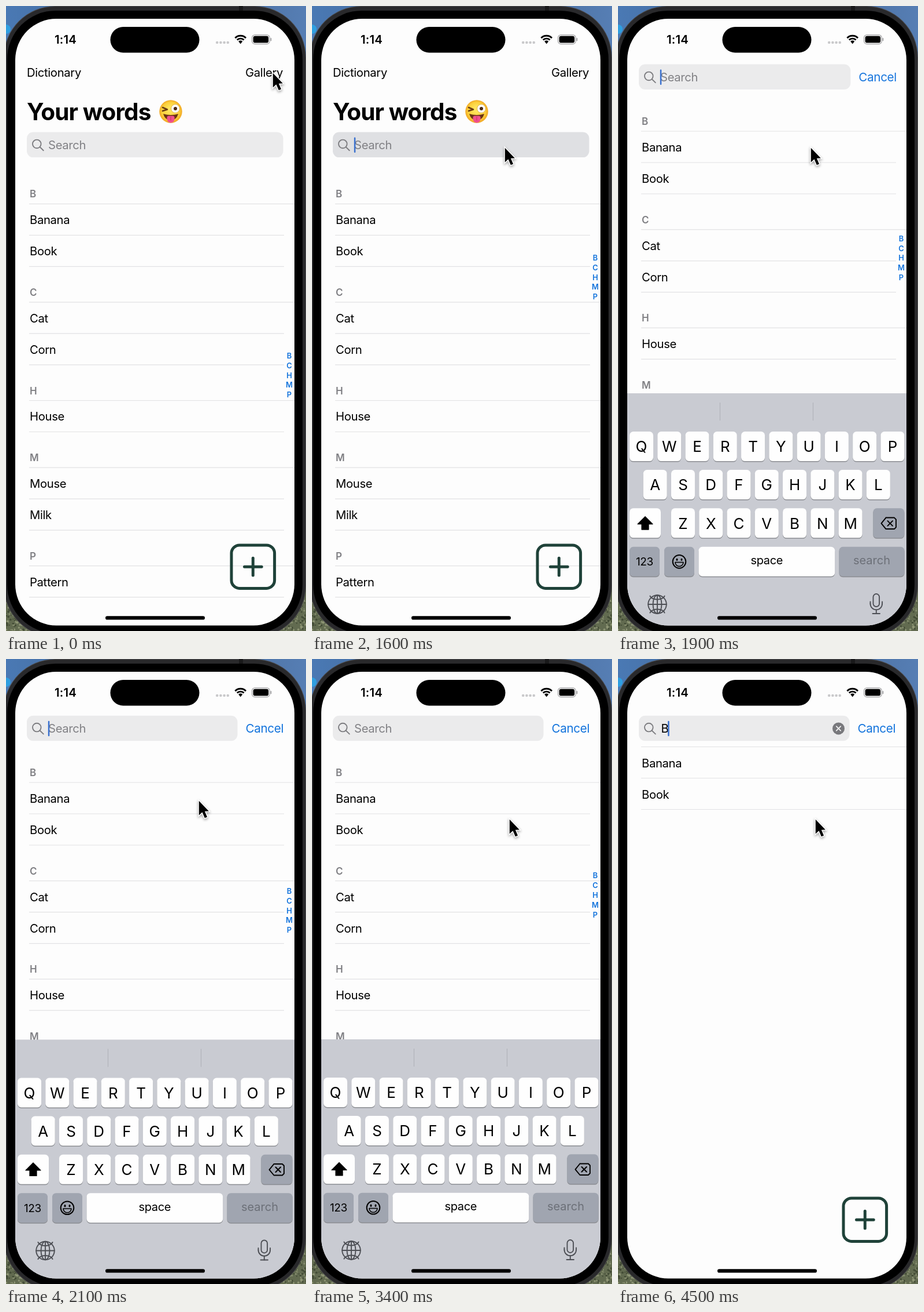
Animation of 519x1078 px, one loop 5000 ms. Source, as an HTML page with a canvas:

```html
<!DOCTYPE html>
<html lang="en">
<head>
<meta charset="utf-8">
<title>Word list search</title>
<style>
html, body { margin: 0; width: 100%; height: 100%; overflow: hidden; background: #000; }
canvas { display: block; width: 519px; height: 1078px; }
</style>
</head>
<body>
<canvas id="stage" width="519" height="1078"></canvas>
<script>
const ctx = document.getElementById('stage').getContext('2d');
const LOOP = 5000, STEP = 100, TAU = Math.PI * 2;
const BLUE = '#1273dc', PAPER = '#fdfdfd', GREY = '#7f7f83';
const SECTIONS = [
  ['B', 'Banana', 'Book'], ['C', 'Cat', 'Corn'], ['H', 'House'],
  ['M', 'Mouse', 'Milk'], ['P', 'Pattern']
];

// Timing helpers
const clamp = v => Math.min(1, Math.max(0, v));
const mix = (a, b, p) => a + (b - a) * p;
const smooth = (t, a, b) => { const u = clamp((t - a) / (b - a)); return u * u * (3 - 2 * u); };
const spring = (t, start) => {
  const x = Math.max(0, t - start) * 0.01826;
  return 1 - (1 + x) * Math.exp(-x);
};

// Drawing helpers
function box(x, y, w, h, r, color) {
  ctx.beginPath();
  ctx.roundRect(x, y, w, h, r);
  ctx.fillStyle = color;
  ctx.fill();
}
function disc(x, y, r, color) {
  ctx.beginPath();
  ctx.arc(x, y, r, 0, TAU);
  ctx.fillStyle = color;
  ctx.fill();
}
function pen(color, width) {
  ctx.strokeStyle = color;
  ctx.lineWidth = width;
  ctx.lineCap = ctx.lineJoin = 'round';
}
function line(...pts) {
  ctx.beginPath();
  for (let i = 0; i < pts.length; i += 2) ctx.lineTo(pts[i], pts[i + 1]);
  ctx.stroke();
}
function ring(x, y, rx, ry = rx, a = 0, b = TAU) {
  ctx.beginPath();
  ctx.ellipse(x, y, rx, ry, 0, a, b);
  ctx.stroke();
}
// y is the middle of the capital letters
function text(s, x, y, size, color = '#000', weight = 400, align = 'left', track = -0.018) {
  ctx.font = `${weight} ${size}px Inter, "Liberation Sans", sans-serif`;
  ctx.letterSpacing = `${track * size}px`;
  ctx.textAlign = align;
  ctx.fillStyle = color;
  ctx.fillText(s, x, y + size * 0.364);
}
const rule = (y, right) => box(40, y - 0.6, right - 40, 1.2, 0, '#e2e2e4');

function backdrop() {
  const sky = ctx.createLinearGradient(0, 0, 519, 0);
  sky.addColorStop(0, '#4a79b4');
  sky.addColorStop(0.5, '#42638f');
  sky.addColorStop(1, '#567eb4');
  box(0, 0, 519, 540, 0, sky);
  disc(0, 40, 8, '#2f9fe0');
  box(0, 540, 519, 538, 0, '#626b50');
  let seed = 7;
  const rnd = () => (seed = seed * 16807 % 2147483647) / 2147483647;
  for (let i = 0; i < 500; i++) {
    const x = rnd() * 60, y = 1015 + rnd() * 63;
    disc(i % 2 ? x : 519 - x, y, 0.8 + rnd() * 1.2, rnd() < 0.5 ? '#434c36' : '#8d9474');
  }
  box(-4, 0, 523, 1089, 89, '#4b4b4d');
  box(-3, 1, 521, 1087, 88, '#29292b');
  box(403, 0, 7, 8, 0, '#19191a');
  box(2, 8, 511, 1074, 84, '#000');
}

function statusBar() {
  text('1:14', 84, 58, 20.4, '#000', 600, 'left', 0.01);
  box(180.5, 36, 154, 44.5, 22.2, '#000');
  for (let i = 0; i < 4; i++) disc(365.2 + i * 6.2, 63, 2.3, '#c9c9cb');
  ctx.strokeStyle = '#000';
  ctx.lineCap = 'butt';
  ctx.lineWidth = 2.9;
  for (const r of [13.2, 8.4]) ring(405.7, 64.5, r, r, -Math.PI * 0.75, -Math.PI * 0.25);
  ctx.beginPath();
  ctx.moveTo(405.7, 65.5);
  ctx.arc(405.7, 64.5, 5, -Math.PI * 0.75, -Math.PI * 0.25);
  ctx.fillStyle = '#000';
  ctx.fill();
  pen('#a0a0a2', 1.2);
  ctx.beginPath();
  ctx.roundRect(425.6, 49.8, 30.6, 15.8, 5);
  ctx.stroke();
  box(427.6, 51.8, 26.6, 11.8, 3.4, '#000');
  box(457.5, 55, 1.8, 5.4, 1, '#a0a0a2');
}

function winkFace(x, y) {
  ctx.save();
  ctx.translate(x, y);
  const skin = ctx.createRadialGradient(0, -4, 4, 0, 0, 20);
  skin.addColorStop(0, '#ffe45c');
  skin.addColorStop(0.7, '#fccf3a');
  skin.addColorStop(1, '#f0a322');
  disc(0, 0, 19.7, skin);
  pen('#6b3d13', 2.6);
  line(-14, -7, -6, -3.5, -14, -1);
  disc(8, -5, 7.4, '#fff');
  pen('#d9a233', 0.8);
  ring(8, -5, 7.4);
  disc(8, -5, 3, '#4c2b14');
  ctx.beginPath();
  ctx.moveTo(-13, 4);
  ctx.quadraticCurveTo(0, 8, 13, 4);
  ctx.quadraticCurveTo(10, 15, 0, 15);
  ctx.quadraticCurveTo(-10, 15, -13, 4);
  ctx.fillStyle = '#6b3312';
  ctx.fill();
  box(-6.5, 7.5, 13, 12, [3, 3, 6.5, 6.5], '#f0508c');
  pen('#c9316c', 1.2);
  line(0, 9, 0, 15);
  ctx.restore();
}

function titles(p) {
  ctx.save();
  ctx.globalAlpha = clamp(1 - p * 1.6);
  ctx.translate(0, -119.5 * p);
  text('Dictionary', 36, 115, 20.3);
  text('Gallery', 479, 115, 20.3, '#000', 400, 'right');
  text('Your words', 36, 182, 40.5, '#000', 700, 'left', -0.023);
  winkFace(285, 182);
  ctx.restore();
}

function caretAlpha(t) {
  if (t < 1600) return 0;
  if (t < 3500) {
    const u = (t - 1600) % 1000;
    return u < 600 ? 1 : u < 900 ? clamp((800 - u) / 200 * 0.5) : clamp((u - 800) / 200);
  }
  if (t < 4100) return 1;
  return t < 4300 ? clamp((4200 - t) / 200) : clamp((t - 4300) / 200);
}

function searchField(t, p, typed) {
  const y = 217.5 - 119.8 * p, mid = y + 22, right = 479.5 - 79 * p;
  const k = t < 1600 ? 1 : p;
  const tone = [mix(223, 235, k), mix(224, 235, k), mix(227, 236, k)].map(Math.round);
  box(36, y, right - 36, 43.6, 11, `rgb(${tone})`);
  pen('#7d7d81', 1.9);
  ring(53.3, mid - 1.6, 7.3);
  line(58.7, mid + 3.8, 64.8, mid + 9.7);
  text(typed ? 'B' : 'Search', typed ? 74.5 : 73, mid + 0.3, 20.3, typed ? '#000' : '#818185');
  if (typed) {
    disc(381.5, mid + 0.2, 10.5, '#78787c');
    pen('#f2f2f3', 1.8);
    line(377.8, mid - 3.5, 385.2, mid + 3.9);
    line(385.2, mid - 3.5, 377.8, mid + 3.9);
  }
  ctx.globalAlpha = caretAlpha(t);
  box(typed ? 86.2 : 72.8, mid - 13, 2.5, 26.5, 1.2, '#3970cf');
  ctx.globalAlpha = p;
  if (p > 0) text('Cancel', right + 14, mid - 0.3, 20.7, BLUE);
  ctx.globalAlpha = 1;
}

function wordList(p) {
  let y = 279.7 - 128.3 * p;
  for (const [letter, ...words] of SECTIONS) {
    text(letter, 41, y + 44.5, 17, GREY, 600);
    y += 61.6;
    rule(y, 499);
    for (const word of words) {
      text(word, 41, y + 27.6, 20.3);
      y += 54;
      rule(y, 481);
    }
  }
}

function matches() {
  rule(151.5, 499);
  ['Banana', 'Book'].forEach((word, i) => {
    text(word, 41, 179.2 + i * 54, 20.3);
    rule(205.5 + i * 54, 499);
  });
}

function letterIndex(t, p) {
  const top = t < 1600 ? 603 : t < 2200 ? 434 - 34 * p : 373.3;
  const squeeze = p * (1 - p) * 4;
  SECTIONS.forEach(([letter], i) =>
    text(letter, 490, top + 2 * squeeze + i * (16.9 - 0.9 * squeeze), 13, BLUE, 600, 'center', 0));
}

function addButton() {
  pen('#1f4239', 5);
  ctx.beginPath();
  ctx.roundRect(390, 930, 74.6, 74.4, 14);
  ctx.stroke();
  line(412.5, 967.2, 442.2, 967.2);
  line(427.3, 952.3, 427.3, 982);
}

function key(x, y, w, label, dim) {
  box(x, y + 1.5, w, 51, 6.5, '#8b8d92');
  box(x, y, w, 51, 6.5, dim ? '#a0a5b0' : '#fefefe');
  if (label) text(label, x + w / 2, y + 25.7, 26, '#000', 400, 'center', 0);
}

function keyboard(top) {
  ctx.save();
  ctx.translate(0, top);
  box(16, 0, 483, 425, 0, '#c9cbd2');
  for (const x of [176.5, 337.5]) box(x - 0.6, 16, 1.2, 31, 0, '#b2b4bb');
  [['QWERTYUIOP', 20, 66], ['ASDFGHJKL', 43.7, 132], ['ZXCVBNM', 92, 198.3]].forEach(([row, x, y]) =>
    [...row].forEach((c, i) => key(x + i * 48.27, y, 41, c)));

  key(20, 198.3, 54, '');
  ctx.beginPath();
  [[47, 212.5], [60, 225.5], [53, 225.5], [53, 235], [41, 235], [41, 225.5], [34, 225.5]]
    .forEach(([x, y]) => ctx.lineTo(x, y));
  ctx.closePath();
  ctx.fillStyle = '#000';
  ctx.fill();
  pen('#000', 1.2);
  ctx.stroke();

  key(441.3, 198.3, 54, '', true);
  pen('#000', 1.9);
  line(463.5, 214.5, 478, 214.5, 481, 217.5, 481, 231, 478, 234, 463.5, 234, 455.5, 224.3, 463.5, 214.5);
  line(466.5, 220, 475, 228.5);
  line(475, 220, 466.5, 228.5);

  key(20, 264.7, 52, '', true);
  text('123', 46, 290.3, 19, '#000', 400, 'center');
  key(80, 264.7, 52, '', true);
  pen('#000', 2);
  ring(106, 290.3, 11.3);
  for (const x of [102, 110]) {
    ctx.beginPath();
    ctx.ellipse(x, 286.8, 1.5, 2.2, 0, 0, TAU);
    ctx.fillStyle = '#000';
    ctx.fill();
  }
  ctx.beginPath();
  ctx.arc(106, 291.5, 7, 0, Math.PI);
  ctx.closePath();
  ctx.lineWidth = 1.6;
  ctx.stroke();
  key(139.5, 264.7, 235.7, '');
  text('space', 257.3, 287.8, 20, '#000', 400, 'center');
  key(382.5, 264.7, 113, '', true);
  text('search', 439, 287.8, 20, '#6c7078', 400, 'center', 0);

  pen('#4d4f55', 1.9);
  ring(68, 364, 15.8);
  ring(68, 364, 7.5, 15.8);
  line(68, 348.2, 68, 379.8);
  line(52.2, 364, 83.8, 364);
  ring(68, 347.5, 13, 8, 0.25, Math.PI - 0.25);
  ring(68, 380.5, 13, 8, Math.PI + 0.25, TAU - 0.25);
  ctx.beginPath();
  ctx.roundRect(441.5, 346, 10.6, 22, 5.3);
  ctx.stroke();
  ring(446.8, 363, 10.3, 10.3, 0, Math.PI);
  line(436.5, 363, 436.5, 359.5);
  line(457.1, 363, 457.1, 359.5);
  line(446.8, 373.3, 446.8, 380);
  line(440.5, 380, 453, 380);
  ctx.restore();
}

const MOVE = [[461, 115], [452, 128], [420, 172], [374, 232], [334, 270], [324, 272], [333, 244]];
function pointer(t) {
  let [x, y] = MOVE[Math.round(clamp((t - 700) / 600) * 6)];
  const p = smooth(t, 2100, 2700);
  x += 8 * p;
  y += 32 * p;
  ctx.save();
  ctx.translate(x + 0.8, y + 0.8);
  ctx.scale(0.95, 0.95);
  ctx.beginPath();
  [[0, 0], [0, 26], [6, 20.6], [10.6, 31], [15, 29.2], [10.6, 19], [18, 18.6]]
    .forEach(([a, b]) => ctx.lineTo(a, b));
  ctx.closePath();
  ctx.shadowColor = 'rgba(0,0,0,.4)';
  ctx.shadowBlur = 4;
  ctx.shadowOffsetY = 2;
  pen('#fff', 3);
  ctx.lineJoin = 'miter';
  ctx.stroke();
  ctx.shadowColor = 'transparent';
  ctx.fillStyle = '#000';
  ctx.fill();
  ctx.restore();
}

function draw(t) {
  const p = smooth(t, 1600, 1930), typed = t >= 3500;
  const shown = t < 3430 ? spring(t, 1605) : 1 - spring(t, 3430);
  ctx.clearRect(0, 0, 519, 1078);
  backdrop();
  ctx.save();
  ctx.beginPath();
  ctx.roundRect(16, 22, 483, 1046.5, 71);
  ctx.clip();
  box(16, 22, 483, 1047, 0, PAPER);
  if (typed) matches();
  else {
    wordList(p);
    letterIndex(t, p);
  }
  titles(p);
  searchField(t, p, typed);
  addButton();
  if (shown > 0.001) keyboard(1068.5 - 412.5 * shown);
  statusBar();
  box(172, 1052.3, 172, 6.2, 3.1, '#000');
  ctx.restore();
  pointer(t);
}

const start = performance.now();
function tick() {
  const t = (performance.now() - start) % LOOP;
  draw(Math.floor(t / STEP) * STEP);
  requestAnimationFrame(tick);
}
tick();
</script>
</body>
</html>
```
